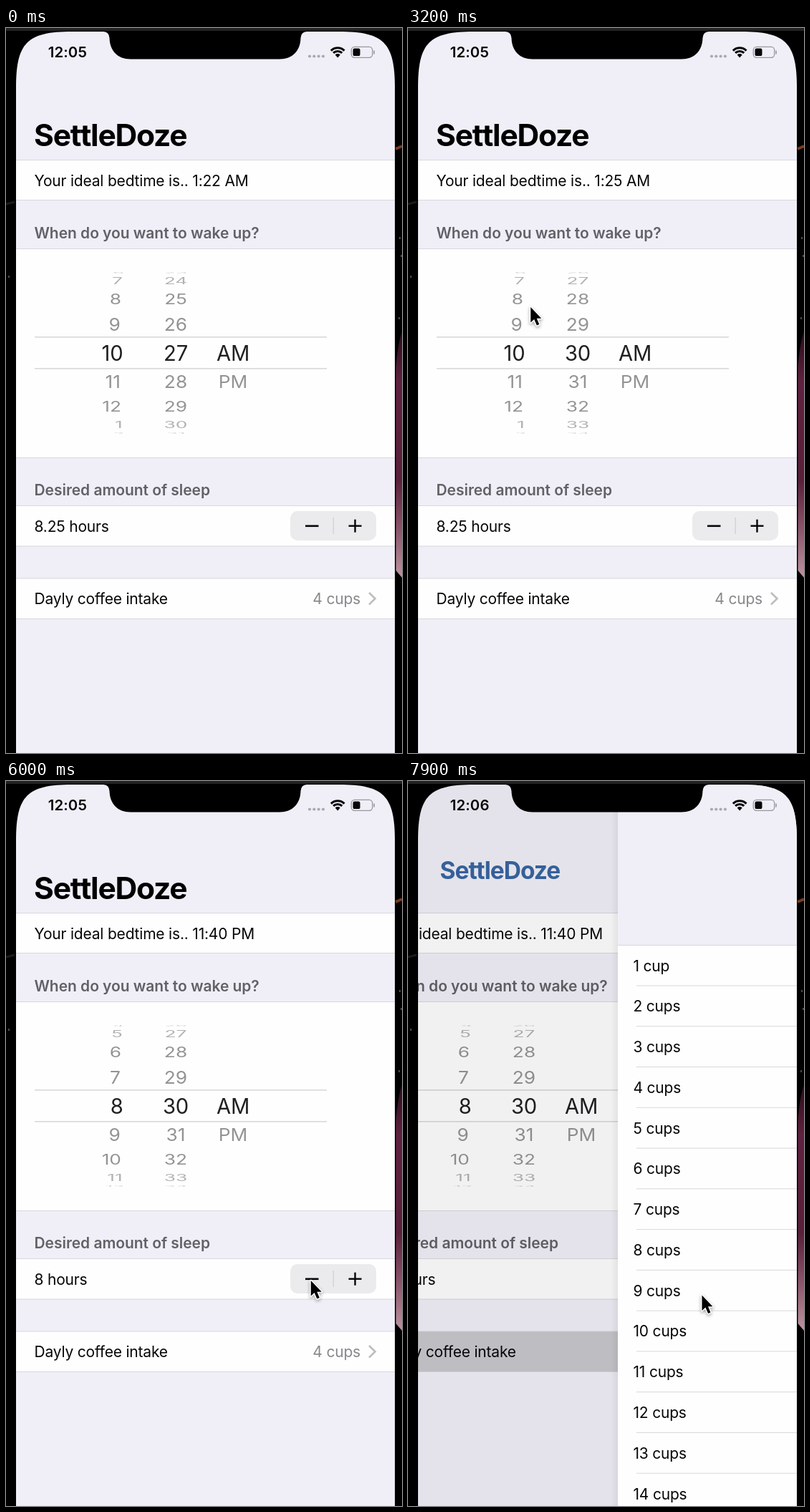
These frames come from a looping animation (553x1013 px, 8000 ms). An HTML page with a canvas:

```html
<!DOCTYPE html>
<html lang="en">
<head>
<meta charset="utf-8">
<title>Sleep planner</title>
<style>
html, body { margin: 0; width: 100%; height: 100%; overflow: hidden; background: #000; }
canvas { display: block; }
</style>
</head>
<body>
<canvas id="stage" width="553" height="1013"></canvas>
<script>
const ctx = document.getElementById('stage').getContext('2d');
const LOOP = 8000, STEP = 100;
const TITLE = 'SettleDoze';
const PAGE = '#f0eff8', RULE = '#d8d8dd';
const HEADER = { weight: 600, color: '#626167', spacing: -0.05 };
const LEFT = 14, RIGHT = 543, TOP = 5, BOTTOM = 1013;

// Keyframes: time, then values
const CURSOR = [
  [100, 525, 705], [200, 437, 645], [300, 437, 645], [500, 279, 493], [700, 279, 493],
  [1100, 251, 510], [2200, 251, 364], [2600, 251, 363], [3300, 165, 389],
  [3600, 165, 430], [3700, 165, 430], [4100, 165, 491], [4600, 165, 491],
  [5300, 480, 670], [5400, 480, 670], [6100, 421, 697], [6400, 421, 697],
  [6600, 437, 791], [6700, 454, 690], [7000, 454, 690], [7500, 428, 794],
  [7800, 428, 794], [7900, 409, 716]
];
const MINUTE = [[1100, 27], [2200, 30.25], [2400, 30.27], [2800, 30]];
const HOUR = [[3300, 10], [3600, 9.07], [3700, 9.07], [4100, 7.65], [4500, 8]];

function at(keys, t) {
  const i = keys.findIndex(k => k[0] > t);
  if (i < 0) return keys[keys.length - 1].slice(1);
  if (i === 0) return keys[0].slice(1);
  const a = keys[i - 1], b = keys[i];
  const p = (t - a[0]) / (b[0] - a[0]), e = p * p * (3 - 2 * p);
  return a.slice(1).map((v, j) => v + (b[j + 1] - v) * e);
}

function rect(x, y, w, h, color) {
  ctx.fillStyle = color;
  ctx.fillRect(x, y, w, h);
}

function text(s, x, y, { size = 21, weight = 400, color = '#060607', align = 'left', spacing = -0.2 } = {}) {
  ctx.font = `${weight} ${size}px Inter, sans-serif`;
  ctx.letterSpacing = spacing + 'px';
  ctx.textAlign = align;
  ctx.fillStyle = color;
  ctx.fillText(s, x, y);
}

function line(points, color, width) {
  ctx.beginPath();
  points.forEach(([x, y]) => ctx.lineTo(x, y));
  ctx.strokeStyle = color;
  ctx.lineWidth = width;
  ctx.stroke();
}

function clipped(x, y, w, h, draw) {
  ctx.save();
  ctx.beginPath();
  ctx.rect(x, y, w, h);
  ctx.clip();
  draw();
  ctx.restore();
}

function section(y, h, color = '#fefefe') {
  rect(LEFT, y, RIGHT - LEFT, h, color);
  rect(LEFT, y - 0.5, RIGHT - LEFT, 1, RULE);
  rect(LEFT, y + h - 0.5, RIGHT - LEFT, 1, RULE);
}

function wallpaper() {
  rect(0, 0, 553, 1013, '#000');
  rect(0, 0, 553, 4, '#232324');
  line([[544, 169], [553, 165]], '#7a3a1c', 4);
  const glow = ctx.createLinearGradient(0, 425, 0, 768);
  glow.addColorStop(0, '#2a0c1b');
  glow.addColorStop(0.2, '#5f2140');
  glow.addColorStop(0.6, '#5a1f3a');
  glow.addColorStop(0.82, '#8f5a70');
  glow.addColorStop(1, '#bd949f');
  ctx.fillStyle = glow;
  ctx.beginPath();
  ctx.moveTo(553, 425);
  ctx.quadraticCurveTo(547, 440, 544.5, 475);
  ctx.lineTo(544.5, 758);
  ctx.lineTo(553, 768);
  ctx.fill();
  [[549, 292], [551, 317], [548, 404], [3, 346]].forEach(([x, y]) => rect(x, y, 2, 3, '#4a4a4c'));
  line([[0, 246], [12, 243]], '#1b1b1c', 3);
}

// Outer rows lie on a cylinder; the centre band is a flat magnifier
function wheel(pos, label, first, last, x, align) {
  const mid = 454, from = Math.max(first, Math.ceil(pos - 4.3)), to = Math.min(last, Math.floor(pos + 4.3));
  const outer = () => {
    for (let i = from; i <= to; i++) {
      const angle = (i - pos) * 0.36, squash = Math.cos(angle);
      if (squash < 0.03) continue;
      ctx.save();
      ctx.translate(align === 'right' ? x - 4 + 2.8 * angle * angle : x, mid + 113.5 * Math.sin(angle));
      ctx.scale(1, squash);
      ctx.globalAlpha = 0.42 * Math.min(1, 0.25 + squash);
      text(label(i), 0, 9.6, { size: 26.3, color: '#000', align, spacing: 0 });
      ctx.restore();
    }
  };
  clipped(x - 60, 341, 110, 91, outer);
  clipped(x - 60, 476, 110, 91, outer);
  clipped(x - 60, 432, 110, 44, () => {
    for (let i = from; i <= to; i++)
      text(label(i), x, mid + 44 * (i - pos) + 10.6, { size: 29.2, color: '#202023', align, spacing: -0.2 });
  });
}

function stepper() {
  ctx.fillStyle = '#ebeaec';
  ctx.beginPath();
  ctx.roundRect(397, 675, 120, 41, 10);
  ctx.fill();
  rect(456.5, 684, 1.3, 23, '#d0d0d3');
  rect(418, 694.5, 18.5, 2.6, '#060607');
  rect(478.5, 694.5, 18, 2.4, '#060607');
  rect(486.3, 686.7, 2.4, 18, '#060607');
}

function form(t) {
  const bedtime = t < 2800 ? '1:22 AM' : t < 4500 ? '1:25 AM' : t < 6000 ? '11:25 PM' : '11:40 PM';
  section(184.5, 56);
  text('Your ideal bedtime is.. ' + bedtime, 39.5, 220.5);
  text('When do you want to wake up?', 39.5, 293.5, HEADER);

  section(308.5, 292);
  wheel(at(HOUR, t)[0], i => String((i + 11) % 12 + 1), -99, 99, 163.5, 'right');
  wheel(at(MINUTE, t)[0], i => String(i % 60).padStart(2, '0'), 0, 99, 237, 'center');
  wheel(0, i => ['AM', 'PM'][i], 0, 1, 317, 'center');
  rect(40, 431.3, 408, 1.2, '#cdcdd1');
  rect(40, 475.3, 408, 1.2, '#cdcdd1');

  text('Desired amount of sleep', 39.5, 653, HEADER);
  section(667.5, 56.5);
  text(t < 6000 ? '8.25 hours' : '8 hours', 39.5, 703.5);
  stepper();

  section(769, 56.5, t < 7600 ? '#fefefe' : '#c8c8cc');
  text('Dayly coffee intake', 39.5, 805);
  text('4 cups', 495, 805, { color: '#88888c', align: 'right' });
  line([[507, 789], [515.5, 797.3], [507, 805.6]], '#bdbdc1', 2.6);
}

function cupList(x) {
  const shade = ctx.createLinearGradient(x - 10, 0, x, 0);
  shade.addColorStop(0, 'rgba(0,0,0,0)');
  shade.addColorStop(1, 'rgba(0,0,0,.06)');
  rect(x - 10, TOP, 10, BOTTOM, shade);
  rect(x, TOP, RIGHT - x, BOTTOM, PAGE);
  rect(x, 229.5, RIGHT - x, BOTTOM, '#fefefe');
  rect(x, 229, RIGHT - x, 1, RULE);
  for (let n = 1; n <= 14; n++) {
    const y = 258 + 56.77 * (n - 1);
    text(n + (n > 1 ? ' cups' : ' cup'), x + 21.5, y + 7.5);
    rect(x + 26, y + 27.5, RIGHT - x - 26, 1, RULE);
  }
}

function notch() {
  ctx.fillStyle = '#000';
  ctx.beginPath();
  ctx.moveTo(136, 4);
  ctx.lineTo(136, 5);
  ctx.quadraticCurveTo(144, 5.5, 144.5, 14);
  ctx.bezierCurveTo(145, 32, 156, 43.5, 174, 43.5);
  ctx.lineTo(382, 43.5);
  ctx.bezierCurveTo(400, 43.5, 411, 32, 411.5, 14);
  ctx.quadraticCurveTo(412, 5.5, 420, 5);
  ctx.lineTo(420, 4);
  ctx.fill();
}

function statusBar(t) {
  notch();
  text(t < 7300 ? '12:05' : '12:06', 58.7, 41.3, { size: 20.4, weight: 600, spacing: 0.1 });
  ctx.fillStyle = '#aaa9b0';
  for (let i = 0; i < 4; i++) {
    ctx.beginPath();
    ctx.arc(424 + 6.3 * i, 39.5, 2.1, 0, 7);
    ctx.fill();
  }
  ctx.strokeStyle = ctx.fillStyle = '#060607';
  ctx.lineWidth = 3;
  [13.2, 8.6].forEach(r => {
    ctx.beginPath();
    ctx.arc(463.2, 41, r, -Math.PI * 0.75, -Math.PI * 0.25);
    ctx.stroke();
  });
  ctx.beginPath();
  ctx.moveTo(463.2, 41.5);
  ctx.arc(463.2, 41, 5, -Math.PI * 0.75, -Math.PI * 0.25);
  ctx.fill();

  ctx.strokeStyle = '#98979d';
  ctx.lineWidth = 1.3;
  ctx.beginPath();
  ctx.roundRect(482.3, 26.3, 29.4, 15, 4.5);
  ctx.stroke();
  ctx.fillStyle = '#060607';
  ctx.beginPath();
  ctx.roundRect(484.5, 28.5, 10, 10.6, 2.2);
  ctx.fill();
  rect(513.2, 31.5, 1.6, 5, '#98979d');
}

// Screen outline with continuous-curvature top corners
function screenPath() {
  const reach = 78, pull = 15.6;
  ctx.beginPath();
  ctx.moveTo(LEFT, BOTTOM);
  ctx.lineTo(LEFT, TOP + reach);
  ctx.bezierCurveTo(LEFT, TOP + pull, LEFT + pull, TOP, LEFT + reach, TOP);
  ctx.lineTo(RIGHT - reach, TOP);
  ctx.bezierCurveTo(RIGHT - pull, TOP, RIGHT, TOP + pull, RIGHT, TOP + reach);
  ctx.lineTo(RIGHT, BOTTOM);
}

function phone(t) {
  const pushed = t >= 7900, edge = 293;
  ctx.save();
  screenPath();
  ctx.clip();
  rect(LEFT, TOP, RIGHT - LEFT, BOTTOM, PAGE);
  if (pushed) {
    ctx.save();
    ctx.translate(-75, 0);
    form(t);
    ctx.restore();
    rect(LEFT, TOP, edge - LEFT, BOTTOM, 'rgba(0,0,0,.05)');
    text(TITLE, 44.5, 137, { size: 33.5, weight: 700, color: '#356099', spacing: -1 });
    cupList(edge);
  } else {
    text(TITLE, 39, 165, { size: 42.5, weight: 700, color: '#000', spacing: -1.2 });
    form(t);
  }
  statusBar(t);
  ctx.restore();
}

function cursor(t) {
  if (t < 100) return;
  const [x, y] = at(CURSOR, t);
  const arrow = new Path2D('M0 0V21.5L4.9 17L8.6 25.5L12 24L8.5 15.7H15Z');
  ctx.save();
  ctx.translate(x + 1.5, y + 2.5);
  ctx.lineJoin = 'round';
  ctx.strokeStyle = '#fff';
  ctx.lineWidth = 3;
  ctx.shadowColor = 'rgba(0,0,0,.35)';
  ctx.shadowBlur = 4;
  ctx.shadowOffsetY = 2;
  ctx.stroke(arrow);
  ctx.shadowColor = 'transparent';
  ctx.fillStyle = '#000';
  ctx.fill(arrow);
  ctx.restore();
}

function frame(now) {
  const t = Math.floor(now % LOOP / STEP) * STEP;
  wallpaper();
  phone(t);
  cursor(t);
  requestAnimationFrame(frame);
}
requestAnimationFrame(frame);
</script>
</body>
</html>
```
